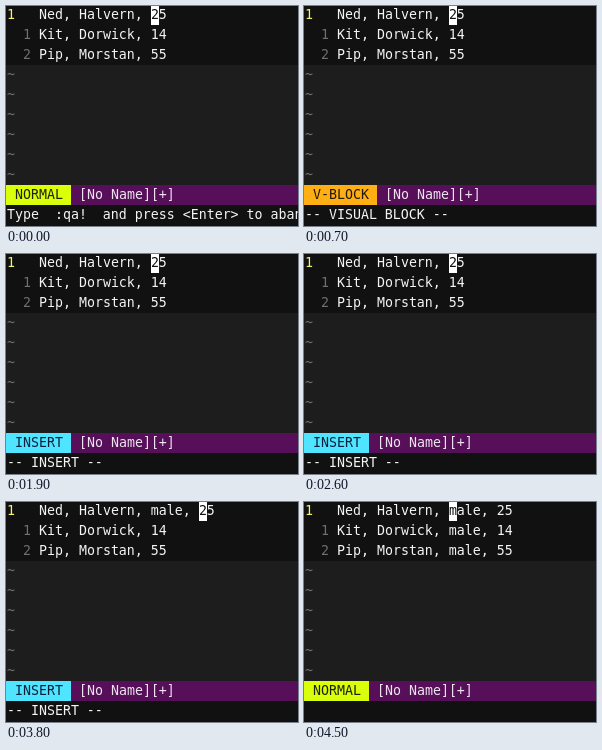
Recreate the animation shown at these times as an HTML page with a canvas. Size 292 by 220 pixels, loop 6.2 s.

```html
<!DOCTYPE html>
<html lang="en">
<head>
<meta charset="utf-8">
<title>Visual block insert</title>
<style>
  html, body { margin: 0; width: 100%; height: 100%; overflow: hidden; background: #1d1d1d; }
  canvas { display: block; }
</style>
</head>
<body>
<canvas id="screen" width="292" height="220"></canvas>
<script>
const ctx = document.getElementById('screen').getContext('2d');
const LOOP = 6200, CELL = 8, LINE = 20;
const WHITE = '#f4f4f4', DARK = '#111111', GREY = '#707070';
const BLOCK_COL = 14;
const people = [
  ['Ned, Halvern, ', '25'],
  ['Kit, Dorwick, ', '14'],
  ['Pip, Morstan, ', '55']
];
const modes = {
  NORMAL: { color: '#d9ff0a', ink: '#20200a', message: '' },
  'V-BLOCK': { color: '#ffaf14', ink: '#20180a', message: '-- VISUAL BLOCK --' },
  INSERT: { color: '#4fe4ff', ink: '#08203c', message: '-- INSERT --' }
};
const hint = 'Type  :qa!  and press <Enter> to abandon';
const inserted = 'male, ';
const keyTimes = [3000, 3200, 3300, 3400, 3600, 3800];

const colX = col => 1 + col * CELL;
const rowY = row => row * LINE - 1;

function fill(color, x, y, w, h) {
  ctx.fillStyle = color;
  ctx.fillRect(x, y, w, h);
}

function text(str, col, row, color) {
  ctx.fillStyle = color;
  ctx.fillText(str, colX(col), row * LINE + 13);
}

function cell(col, row, char, back, ink) {
  fill(back, colX(col), rowY(row), CELL, LINE);
  text(char, col, row, ink);
}

// Editor state at time t
function stateAt(t) {
  const typed = keyTimes.filter(k => t >= k).length;
  const s = { mode: 'NORMAL', row: 0, col: BLOCK_COL, added: ['', '', ''], cursor: true };
  if (t < 700) {
    s.message = hint;
    s.cursor = t < 500;
  } else if (t < 1900) {
    s.mode = 'V-BLOCK';
    s.row = t < 800 ? 0 : t < 1000 ? 1 : 2;
  } else if (t < 4200) {
    s.mode = 'INSERT';
    s.added[0] = inserted.slice(0, typed);
    s.col += typed;
    if (t >= 4000) {
      s.col--;
      s.message = '';
    }
  } else {
    s.added.fill(inserted);
  }
  return s;
}

function draw(t) {
  const s = stateAt(t), mode = modes[s.mode];
  fill('#1d1d1d', 0, 0, 292, 220);
  fill(DARK, 0, 0, 292, rowY(3));
  fill('#560f58', 0, rowY(9), 292, LINE);
  fill(DARK, 0, rowY(10), 292, 21);

  people.forEach(([name, age], row) => {
    const line = name + s.added[row] + age;
    const current = row === s.row;
    text(current ? row + 1 : Math.abs(row - s.row), current ? 0 : 2, row, current ? '#f5f56a' : GREY);
    text(line, 4, row, WHITE);
    if (s.mode === 'V-BLOCK' && row < s.row) cell(4 + BLOCK_COL, row, line[BLOCK_COL], '#585858', WHITE);
    if (current && s.cursor) cell(4 + s.col, row, line[s.col], '#ffffff', DARK);
  });
  for (let row = 3; row < 9; row++) text('~', 0, row, GREY);

  const label = ` ${s.mode} `;
  fill(mode.color, 0, rowY(9), colX(label.length), LINE);
  text(label, 0, 9, mode.ink);
  text('[No Name][+]', label.length + 1, 9, '#eee4ee');
  text(s.message ?? mode.message, 0, 10, WHITE);
}

ctx.font = '13.288px "DejaVu Sans Mono", monospace';
function tick() {
  draw(performance.now() % LOOP);
  requestAnimationFrame(tick);
}
tick();
</script>
</body>
</html>
```
